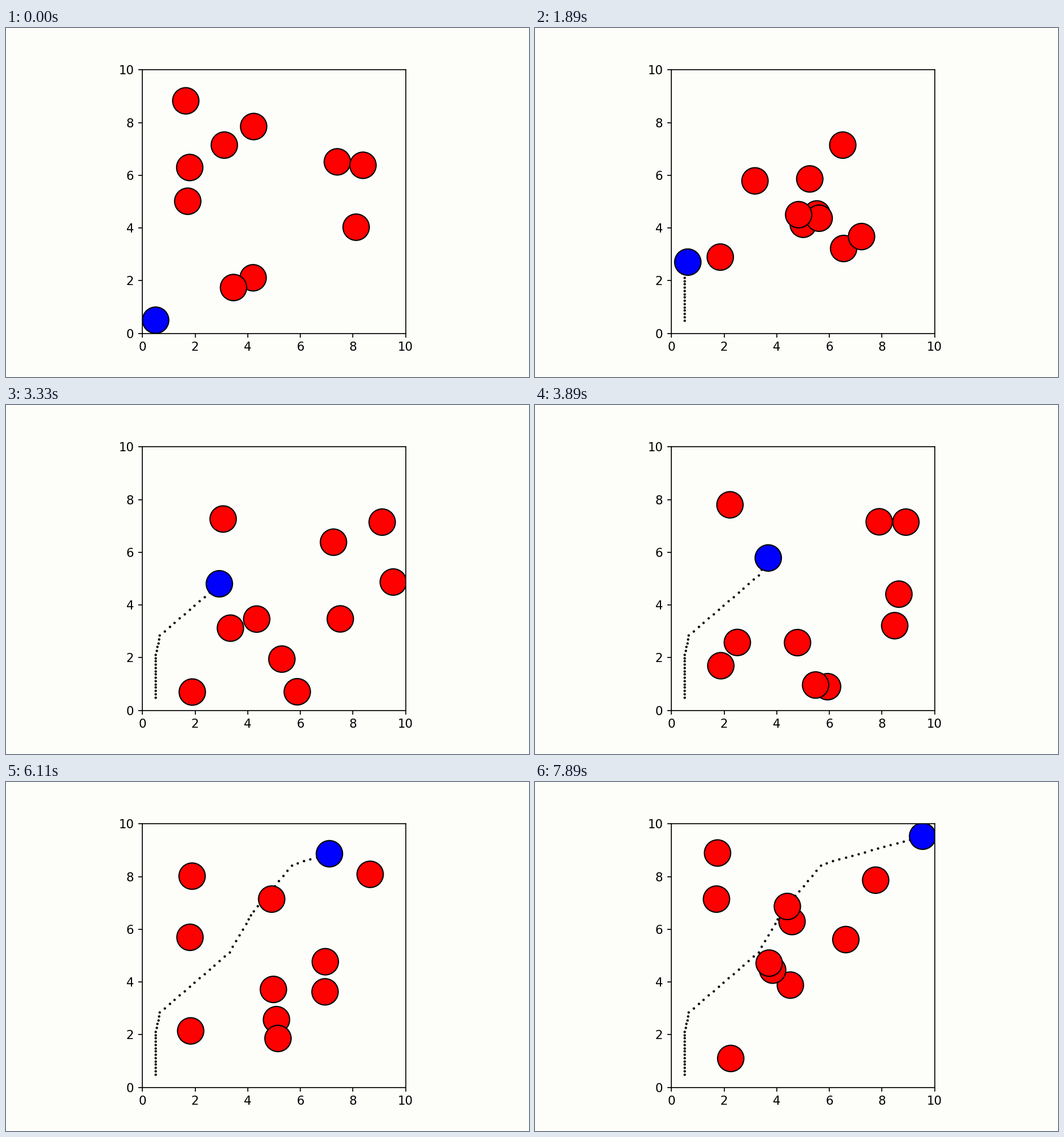
Animation of 917x611 px, one loop 8000 ms. Source, as a matplotlib script:

```python
import matplotlib.pyplot as plt
import numpy as np
from matplotlib.animation import FuncAnimation
from matplotlib.patches import Circle

W, H, DPI = 917, 611, 144
K = H / 4 / DPI  # scales point sizes to a 6 x 4 inch layout
LOOP, FRAMES, STEPS = 8000, 200, 72  # 72 simulation steps on a 40 ms clock
SIZE, RADIUS, SPEED = 10, 0.5, 0.2
BACK = "#fdfefa"

# start x, start y, heading in degrees; back to front
OBSTACLES = [
    (3.11, 7.145, 0), (1.795, 6.295, -89), (7.405, 6.51, -104.7),
    (8.38, 6.38, -147.1), (8.12, 4.03, 147.4), (1.72, 5.015, -14.9),
    (4.205, 2.11, 27.4), (3.46, 1.74, 50.7), (1.645, 8.825, -63.3),
    (4.225, 7.85, -79.7),
]

# the robot drives straight between these turns: step, x, y
TURNS = [
    (0, 0.5, 0.5), (13, 0.5, 2.12), (18, 0.65, 2.85), (32, 3.3, 5.13),
    (37, 3.93, 6.22), (40, 4.21, 6.69), (49, 5.67, 8.42), (51, 6.13, 8.6),
    (65, 9.545, 9.533),
]


def obstacle_path(x, y, heading):
    """Straight run that reverses once it has passed a wall."""
    pos = np.array([x, y])
    a = np.radians(heading)
    vel = SPEED * np.array([np.cos(a), np.sin(a)])
    path = [pos]
    for _ in range(STEPS - 1):
        pos = pos + vel
        if pos.min() < RADIUS or pos.max() > SIZE - RADIUS:
            vel = -vel
        path.append(pos)
    return path


def robot_route():
    when, x, y = np.transpose(TURNS)
    steps = np.arange(STEPS)
    return np.column_stack([np.interp(steps, when, c) for c in (x, y)])


def add_ball(center, color):
    return ax.add_patch(Circle(center, RADIUS, fc=color, ec="black", lw=K))


plt.rcParams.update({"font.family": "DejaVu Sans", "font.size": 10 * K})
fig, ax = plt.subplots(figsize=(W / DPI, H / DPI), dpi=DPI, facecolor=BACK)
fig.subplots_adjust(left=0.125, right=0.9, bottom=0.125, top=0.88)
ticks = range(0, SIZE + 1, 2)
ax.set(xlim=(0, SIZE), ylim=(0, SIZE), aspect="equal", facecolor=BACK,
       xticks=ticks, yticks=ticks)
ax.tick_params(length=3.5 * K, width=0.8 * K, pad=3.5 * K)
for spine in ax.spines.values():
    spine.set_linewidth(0.8 * K)

route = robot_route()
paths = [obstacle_path(*o) for o in OBSTACLES]
trail, = ax.plot([], [], "ko", ms=K, mew=K, zorder=0.9)
reds = [add_ball(p[0], "red") for p in paths]
robot = add_ball(route[0], "blue")


def draw(n):
    step = ((n + 1) * STEPS - 1) // FRAMES
    trail.set_data(*route[:step + 1].T)
    for red, path in zip(reds, paths):
        red.center = path[step]
    robot.center = route[step]
    return [trail, *reds, robot]


anim = FuncAnimation(fig, draw, frames=FRAMES, interval=LOOP // FRAMES,
                     repeat=True, repeat_delay=0, blit=False)
plt.show()
```
